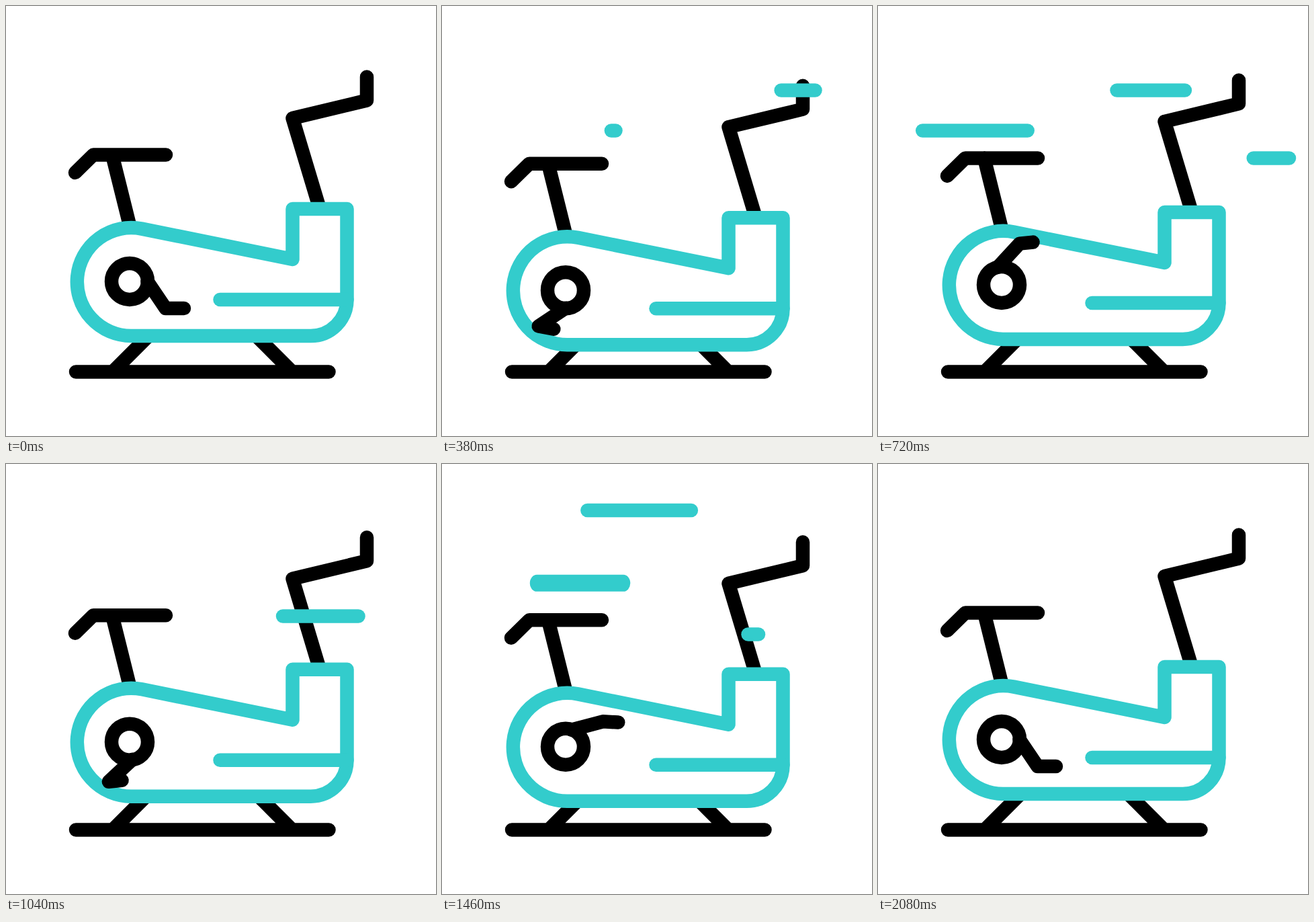
These frames come from a looping animation (640x640 px, 2400 ms). An HTML page:

```html
<!DOCTYPE html>
<html lang="en">
<head>
<meta charset="utf-8">
<title>Exercise bike</title>
<style>
html, body { margin: 0; height: 100%; overflow: hidden; background: #fff; }
svg { display: block; width: 640px; height: 640px; }
path, circle { fill: none; stroke-width: 20.5; stroke-linecap: round; stroke-linejoin: round; }
.ink { stroke: #000; }
.teal { stroke: #3cc; }
</style>
</head>
<body>
<svg viewBox="0 0 640 640">
  <path class="ink" d="M104 544.5H480.5M158.7 544.5L212.7 490.5M426 544.5L372 490.5"/>
  <g id="bike">
    <path class="ink" d="M103 248L130 221.5H238M158 221.5L185 330M467 302L426.5 167L537 140.5V105.5"/>
    <path class="teal" style="fill:#fff" d="M186.3 491A80.5 80.5 0 1 1 202.3 331.6L426.5 377V302H507.5V437A54 54 0 0 1 453 491Z"/>
    <path class="teal" d="M318.5 437H507.5"/>
    <circle class="ink" cx="184" cy="410" r="27"/>
    <path class="ink" id="crank"/>
  </g>
  <g id="wind"></g>
</svg>
<script>
const LOOP = 2400, RIDE = 1813, BOB = 1750;
const LENGTH = 200, GROW = 440, LAG = 272, SHRINK = 430;
const { PI, sin, cos, abs } = Math;
const [bike, crank, wind] = ['bike', 'crank', 'wind'].map(id => document.getElementById(id));

const clamp = u => Math.min(1, Math.max(0, u));
const ease = u => (u = clamp(u), u * u * (3 - 2 * u));

// A streak grows leftwards from its right end, then its tail catches up
function streak(x, y, start, scale = 1) {
  const el = document.createElementNS('http://www.w3.org/2000/svg', 'path');
  el.setAttribute('class', 'teal');
  el.setAttribute('transform', `translate(${x} ${y}) scale(1 ${scale})`);
  wind.append(el);
  return t => {
    const head = LENGTH * ease((t - start) / GROW);
    const tail = LENGTH * ease((t - start - LAG) / SHRINK);
    el.setAttribute('d', head - tail > 0.7 ? `M${-tail} 0H${-head}` : '');
  };
}

const streaks = [
  streak(555.5, 125.5, 236),
  streak(258.5, 185.5, 333),
  streak(612, 226.5, 572),
  streak(376, 69, 1148),
  streak(270, 177.3, 1198, 1.22),
  streak(471, 253.5, 1386)
];

// Two dips, with the middle of the ride slightly delayed
function bob(t) {
  const x = clamp(t / BOB);
  const phase = 4 * x - 0.046 * sin(PI * x);
  return 14.1 * ease(1 - abs(1 - phase % 2));
}

// Two turns with a brisk start; the pedal shortens and tilts on the way
function crankPath(t) {
  const x = clamp(t / RIDE);
  const turn = 4 * PI * ease(x + 0.175 * x * (1 - x) ** 5);
  const c = cos(turn), s = sin(turn);
  const spin = (px, py) => [184 + px * c - py * s, 410 + px * s + py * c];
  const pedal = [27.5 - 8 * sin(PI * x), 6 * (1 - x) * sin(3 * PI * x)];
  return `M${spin(26.5, 0)}L${spin(53.5, 40)}l${pedal.map(v => v.toFixed(3))}`;
}

function draw(t) {
  bike.setAttribute('transform', `translate(0 ${bob(t)})`);
  crank.setAttribute('d', crankPath(t));
  streaks.forEach(update => update(t));
}

const begin = performance.now();
function tick() {
  draw((performance.now() - begin) % LOOP);
  requestAnimationFrame(tick);
}
tick();
</script>
</body>
</html>
```
